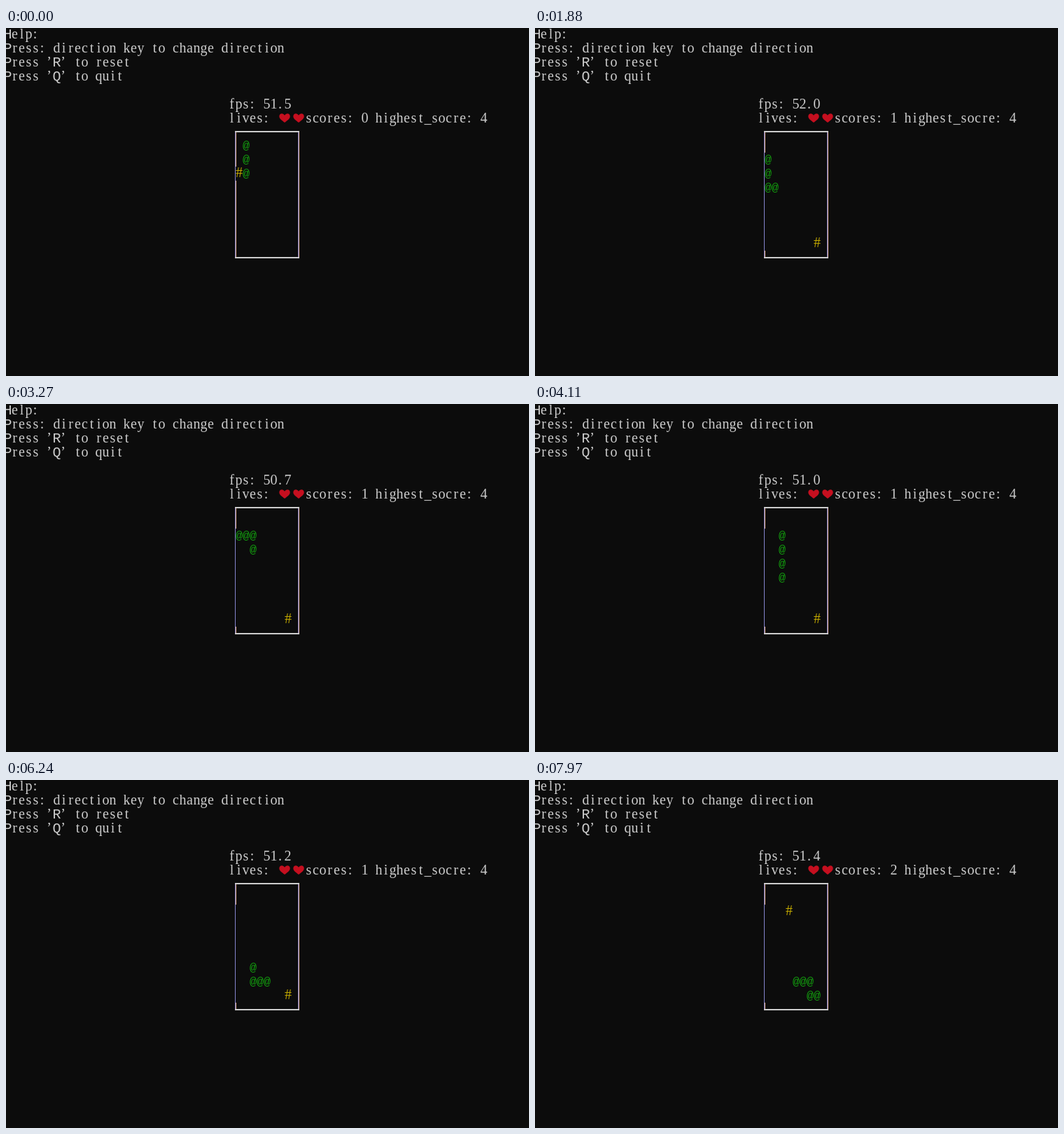
Recreate the animation shown at these times as an HTML page with a canvas. Size 747 by 497 pixels, loop 8000 ms.

```html
<!DOCTYPE html>
<html lang="en">
<head>
<meta charset="utf-8">
<title>Terminal snake</title>
<style>
html, body { margin: 0; width: 100%; height: 100%; overflow: hidden; background: #0c0c0c; }
canvas { display: block; }
</style>
</head>
<body>
<canvas id="screen" width="747" height="497"></canvas>
<script>
const ctx = document.getElementById('screen').getContext('2d');
const LOOP = 8000, FIRST_STEP = 20, STEP = 447, FPS_TICK = 70;
const CELL_W = 10, CELL_H = 20, BOARD_X = 328, BOARD_Y = 158;
const SERIF = '20px "Liberation Serif", serif';
const CAPITAL = '20px "Liberation Mono", monospace';
const MONO = '16.67px "Liberation Mono", monospace';
const COLOR = { back: '#0c0c0c', text: '#cccccc', snake: '#13a10e', food: '#c1a800',
                heart: '#c50f1f', edgeLeft: '#8484cc', edgeRight: '#e0b090' };

const MOVES = { U: [0, -1], D: [0, 1], L: [-1, 0], R: [1, 0] };
const trail = [[1, 0]];
for (const key of 'DD' + 'DLUURRDDDDDRRRRDR') {
  const [x, y] = trail[trail.length - 1], [dx, dy] = MOVES[key];
  trail.push([x + dx, y + dy]);
}
const foods = [[0, 2], [7, 7], [3, 1]];
const fpsPoints = [[0, 51.5], [1050, 50.9], [1880, 52], [3270, 50.7],
                   [4940, 50.6], [6240, 51.2], [7970, 51.4], [8040, 51.4]];

function rect(x, y, w, h, color) {
  ctx.fillStyle = color;
  ctx.fillRect(x, y, w, h);
}

// One character per terminal cell; small punctuation sits left of centre.
function print(text, x, row) {
  ctx.fillStyle = COLOR.text;
  [...text].forEach((char, i) => {
    const offset = '’.:'.includes(char) ? 3.5 : 4.5;
    ctx.font = /[A-Z]/.test(char) ? CAPITAL : SERIF;
    ctx.fillText(char, x + i * CELL_W + offset, row * CELL_H + 15);
  });
}

function piece(char, [col, row], font, color) {
  ctx.font = font;
  ctx.fillStyle = color;
  ctx.fillText(char, BOARD_X + col * CELL_W + 5, BOARD_Y + row * CELL_H + 15);
}

function heart(x, y) {
  ctx.fillStyle = COLOR.heart;
  ctx.beginPath();
  ctx.moveTo(x, y + 6.5);
  ctx.bezierCurveTo(x - 4, y + 3.5, x - 7.7, y + 1, x - 7.7, y - 2.3);
  ctx.bezierCurveTo(x - 7.7, y - 7, x - 2, y - 7.5, x, y - 3.7);
  ctx.bezierCurveTo(x + 2, y - 7.5, x + 7.7, y - 7, x + 7.7, y - 2.3);
  ctx.bezierCurveTo(x + 7.7, y + 1, x + 4, y + 3.5, x, y + 6.5);
  ctx.fill();
}

function fpsAt(time) {
  const i = fpsPoints.findIndex(([start]) => start > time) - 1;
  const [start, from] = fpsPoints[i], [end, to] = fpsPoints[i + 1];
  const tick = Math.floor((time - start) / FPS_TICK);
  const part = tick * FPS_TICK / (end - start);
  const jitter = Math.sin(tick * 12.9 + i) * Math.min(tick, 1) * 0.5;
  return (from + (to - from) * part + jitter).toFixed(1);
}

function drawBoard(step) {
  for (const x of [328, 418]) {
    rect(x - 1, 148, 1, 180, COLOR.edgeLeft);
    rect(x, 148, 1, 180, COLOR.edgeRight);
  }
  for (const y of [147, 327]) rect(327, y, 92, 2, COLOR.text);
  // Redrawn cells clip the right half of the left border.
  const top = step < 4 ? 2 : 1;
  const bottom = step < 2 ? 3 : step < 3 ? 4 : 8;
  rect(BOARD_X, BOARD_Y + top * CELL_H, 1, (bottom - top) * CELL_H, COLOR.back);
}

function draw(time) {
  const step = Math.max(0, Math.floor((time - FIRST_STEP) / STEP));
  const score = step >= 17 ? 2 : step >= 3 ? 1 : 0;
  rect(0, 0, 747, 497, COLOR.back);
  ctx.textAlign = 'center';

  print('Help:', -2, 0);
  print('Press: direction key to change direction', -2, 1);
  print('Press ’R’ to reset', -2, 2);
  print('Press ’Q’ to quit', -2, 3);
  print('fps: ' + fpsAt(time), 318, 5);
  print('lives: ', 318, 6);
  heart(398, 128.5);
  heart(418, 128.5);
  print(`scores: ${score} highest_socre: 4`, 428, 6);

  drawBoard(step);
  piece('#', foods[score], SERIF, COLOR.food);
  for (const cell of trail.slice(step - score, step + 3)) piece('@', cell, MONO, COLOR.snake);
}

function frame() {
  draw(performance.now() % LOOP);
  requestAnimationFrame(frame);
}
frame();
</script>
</body>
</html>
```
